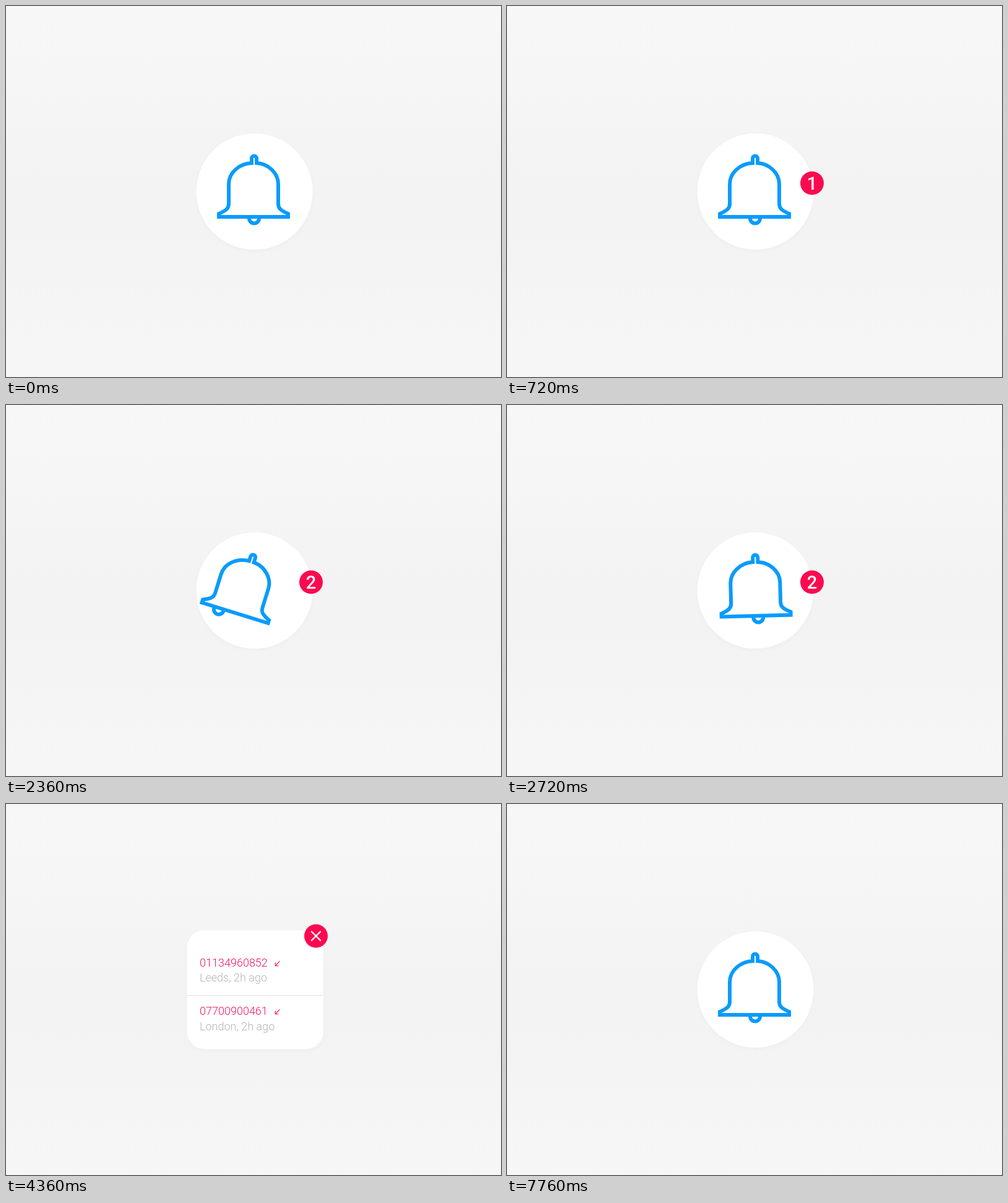
These frames come from a looping animation (800x600 px, 8000 ms). An HTML page:

```html
<!DOCTYPE html>
<html lang="en">
<head>
<meta charset="utf-8">
<title>Notification bell</title>
<style>
  html, body { margin: 0; width: 100%; height: 100%; overflow: hidden; background: #f6f6f6; }
  svg { display: block; width: 100vw; height: 100vh; }
  text { font-family: Roboto, Arial, sans-serif; }
  .count { font-size: 29px; font-weight: 500; fill: #fff; text-anchor: middle; }
  .number, .place { font-size: 18px; font-weight: 300; }
  .number { fill: #f4125c; }
  .place { fill: #b0b5bb; }
  .arrow { fill: none; stroke: #f4125c; stroke-width: 1.1; }
  .bell { fill: none; stroke: #0a9bfb; stroke-width: 6; }
</style>
</head>
<body>
<svg viewBox="0 0 800 600">
  <defs>
    <linearGradient id="sky" x1="0" y1="0" x2="0" y2="1">
      <stop offset="0" stop-color="#f7f7f7"/>
      <stop offset=".3" stop-color="#f5f5f5"/>
      <stop offset=".45" stop-color="#f3f3f3"/>
      <stop offset=".62" stop-color="#f3f3f3"/>
      <stop offset=".8" stop-color="#f5f5f5"/>
      <stop offset="1" stop-color="#f6f6f6"/>
    </linearGradient>
    <filter id="shade" x="-20%" y="-20%" width="140%" height="140%">
      <feDropShadow dx="0" dy="2" stdDeviation="3" flood-color="#000" flood-opacity=".025"/>
    </filter>
  </defs>
  <rect width="800" height="600" fill="url(#sky)"/>
  <rect id="panel" fill="#fff" filter="url(#shade)"/>

  <g id="bell" class="bell">
    <path d="M344 341V336C355 331 360 328 360 320V288C360 269.500 377 254.800 397 254V246.500A4 4 0 0 1 405 246.500V254C423 254.800 440 269.500 440 288V320C440 328 445 331 456 336V341Z"/>
    <path id="clapper" d="M393 343.500A8 8 0 0 0 409 343.500"/>
  </g>

  <g id="badge">
    <circle r="19" fill="#fb0a50"/>
    <text id="one" class="count" y="10">1</text>
    <text id="two" class="count" y="10">2</text>
  </g>

  <g id="row1">
    <text class="number" x="313" y="262.500">01134960852</text>
    <text class="place" x="313" y="287">Leeds, 2h ago</text>
    <path class="arrow" d="M442.500 254.200L435.300 261.500M435.300 256.500V261.700H440.500"/>
  </g>
  <path id="divider" d="M293 309.500H512.500" stroke="#dfe2e5"/>
  <g id="row2">
    <text class="number" x="313" y="341">07700900461</text>
    <text class="place" x="313" y="365.500">London, 2h ago</text>
    <path class="arrow" d="M442.500 332.200L435.300 339.500M435.300 334.500V339.700H440.500"/>
  </g>

  <g id="close">
    <circle r="19" fill="#fb0a50"/>
    <path d="M-7 -7L7 7M7 -7L-7 7" stroke="#fff" stroke-width="2.400" stroke-linecap="round"/>
  </g>
</svg>
<script>
  const LOOP = 8000, SWING = 18;
  const el = {};
  document.querySelectorAll("svg [id]").forEach(n => el[n.id] = n);

  const ease = u => u < .5 ? 2 * u * u : 1 - 2 * (1 - u) ** 2;
  const ramp = (t, a, b) => ease(Math.min(1, Math.max(0, (t - a) / (b - a))));
  const mix = (a, b, u) => a + (b - a) * u;

  function fade(node, v) {
    node.setAttribute("opacity", v);
  }

  function pop(node, x, y, s) {
    node.setAttribute("transform", `translate(${x} ${y}) scale(${s})`);
    node.setAttribute("visibility", s > 0.001 ? "visible" : "hidden");
  }

  // One ring: right, left, right, rest
  function ring(t, start, length) {
    const keys = [0, -SWING, SWING, -SWING, 0];
    const p = (t - start) / length * 4;
    if (p <= 0 || p >= 4) return 0;
    const i = Math.floor(p);
    return mix(keys[i], keys[i + 1], ease(p - i));
  }

  function setPanel(left, top, right, bottom, radius) {
    const box = { x: left, y: top, width: right - left, height: bottom - top, rx: radius };
    for (const k in box) el.panel.setAttribute(k, box[k]);
  }

  function draw(t) {
    const angle = ring(t, 0, 720) + ring(t, 2000, 760);
    el.bell.setAttribute("transform", `rotate(${angle} 401 240)`);
    el.clapper.setAttribute("transform", `translate(${-1.6 * angle} 0)`);
    fade(el.bell, 1 - ramp(t, 3160, 3440) + ramp(t, 7480, 7760));

    pop(el.badge, 493, 286.5, ramp(t, 0, 280) - ramp(t, 3160, 3440));
    const second = ramp(t, 2000, 2240);
    fade(el.one, 1 - second);
    fade(el.two, second);

    if (t >= 3680 && t < 7240) {
      const g = ramp(t, 3680, 4360) - ramp(t, 7040, 7160);
      setPanel(mix(294, 292.5, g), mix(205.5, 204, g), mix(512, 513, g), mix(395, 396.5, g), mix(25, 28, g));
    } else {
      setPanel(307.5, 206, 495.5, 394, 94);
    }

    const out = ramp(t, 7040, 7240);
    fade(el.row1, ramp(t, 3680, 4000) - out);
    fade(el.row2, ramp(t, 3840, 4200) - out);
    fade(el.divider, t < 7060 ? ramp(t, 3760, 4120) : 0);
    pop(el.close, 501, 213.5, ramp(t, 4080, 4360) - out);
  }

  const begin = performance.now();
  function tick() {
    draw((performance.now() - begin) % LOOP);
    requestAnimationFrame(tick);
  }
  tick();
</script>
</body>
</html>
```
